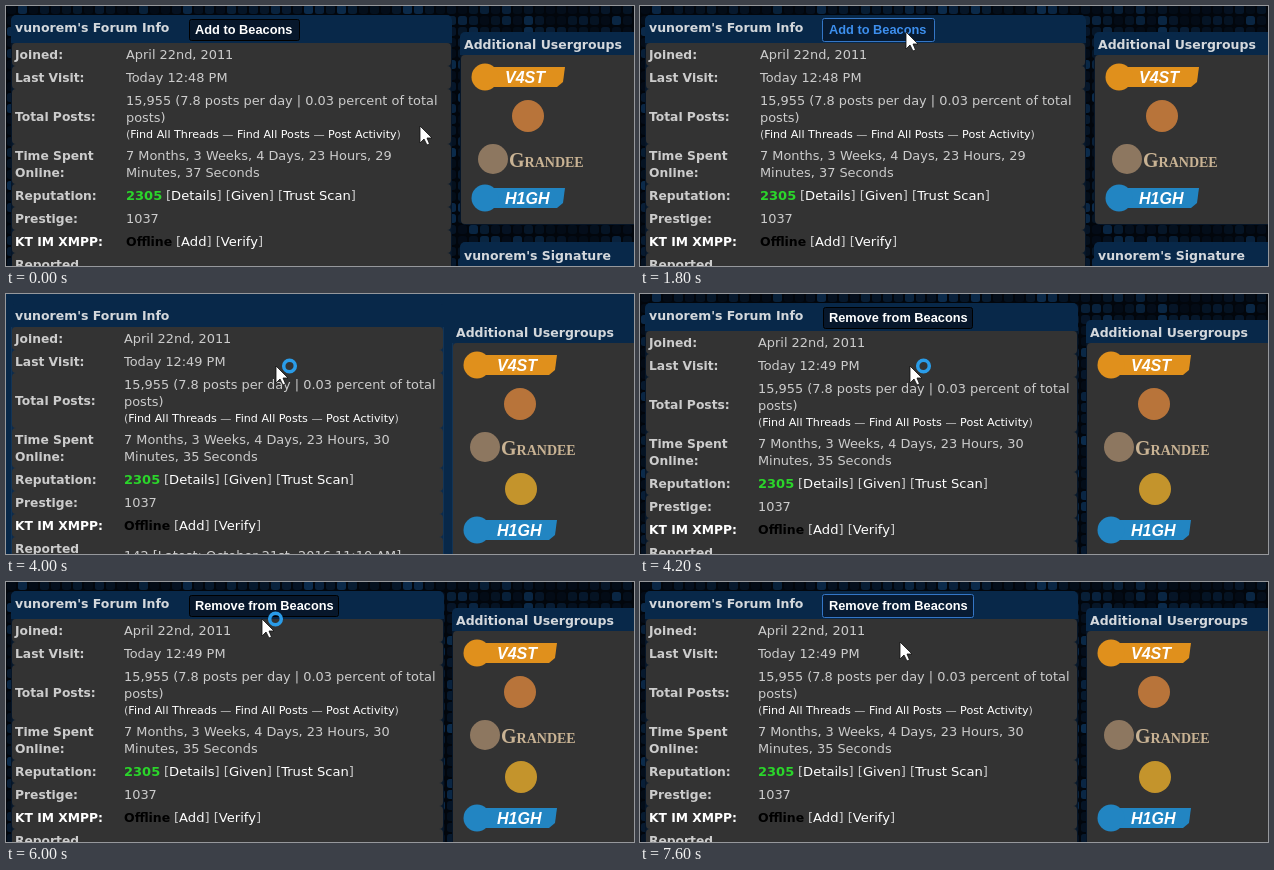
Recreate the animation shown at these times as an HTML page with a canvas. Size 628 by 260 pixels, loop 8000 ms.

```html
<!DOCTYPE html>
<html lang="en">
<head>
<meta charset="utf-8">
<title>Forum profile</title>
<style>
  html, body { margin: 0; width: 100%; height: 100%; overflow: hidden; background: #02060c; }
  canvas { display: block; }
</style>
</head>
<body>
<canvas id="stage" width="628" height="260"></canvas>
<script>
const ctx = document.getElementById('stage').getContext('2d');
const LOOP = 8000, STEP = 200;
const USER = 'vunorem', GROUP = 'Beacons';

const SANS = '"DejaVu Sans", sans-serif';
const BODY = '12.9px ' + SANS;
const LINK = '13.1px ' + SANS;
const BOLD = 'bold 12.5px ' + SANS;
const LABEL = 'bold 12.3px ' + SANS;
const SMALL = '11.15px ' + SANS;
const BUTTON = 'bold 12.8px "Liberation Sans", sans-serif';
const GRAY = '#cccccc', WHITE = '#ffffff', NAVY = '#082849', PANEL = '#333333';

// Pointer tip: [time, x, y]
const PATH = [
  [0, 414, 120], [1200, 303, 42], [1400, 282, 32], [1800, 266, 26],
  [3200, 266, 26], [3800, 268, 65], [4000, 270, 72], [5200, 270, 72],
  [6000, 256, 37], [6400, 254, 25], [7000, 254, 25], [7600, 260, 60], [LOOP, 260, 60]
];

function pointerAt(t) {
  const i = PATH.findIndex(key => key[0] > t);
  const [t0, x0, y0] = PATH[i - 1], [t1, x1, y1] = PATH[i];
  const k = (t - t0) / (t1 - t0);
  return [Math.round(x0 + (x1 - x0) * k), Math.round(y0 + (y1 - y0) * k)];
}

function text(str, x, y, font = BODY, color = GRAY) {
  ctx.font = font;
  ctx.fillStyle = color;
  ctx.fillText(str, x, y);
  return x + ctx.measureText(str).width;
}

// Words between *stars* are links
function linked(str, x, y, font = LINK) {
  str.split('*').forEach((part, i) => { x = text(part, x, y, font, i % 2 ? WHITE : GRAY); });
}

function box(x, y, w, h, radius, fill, stroke) {
  ctx.beginPath();
  ctx.roundRect(x, y, w, h, radius);
  ctx.fillStyle = fill;
  ctx.fill();
  if (stroke) {
    ctx.strokeStyle = stroke;
    ctx.lineWidth = 1;
    ctx.stroke();
  }
}

function polygon(points, fill) {
  ctx.beginPath();
  points.forEach(([x, y]) => ctx.lineTo(x, y));
  ctx.closePath();
  ctx.fillStyle = fill;
  ctx.fill();
}

function disc(x, y, r, fill) {
  ctx.beginPath();
  ctx.arc(x, y, r, 0, 7);
  ctx.fillStyle = fill;
  ctx.fill();
}

function background(plain) {
  ctx.fillStyle = plain ? NAVY : '#02060c';
  ctx.fillRect(0, 0, 628, 260);
  if (plain) return;
  for (let row = 0; row < 24; row++) {
    for (let col = 0; col < 58; col++) {
      const noise = (Math.abs(Math.sin(col * 12.9898 + row * 78.233) * 43758.5453) % 1) ** 2;
      box(col * 11 + 1, row * 11 - 1, 9, 9, 2.5, `rgb(${3 + 8 * noise},${11 + 32 * noise},${22 + 54 * noise})`);
    }
  }
}

function panel(x, y, w, headHeight, h, title, baseline, plain) {
  box(x + .5, y + .5, w, h, 5, plain ? '#0c2b4c' : '#08192c', plain ? '#123456' : '#061527');
  box(x, y, w + 1, headHeight, [5, 5, 0, 0], NAVY);
  text(title, x + 4, baseline, BOLD, '#d4d8dc');
}

function profile(after, loading) {
  const lift = loading ? -4 : 0, x = after ? 118 : 120, width = after ? 432 : 440;
  panel(5, 9, width, 28 + lift, 270, USER + "'s Forum Info", 26, loading);

  ctx.save();
  ctx.translate(0, lift);
  const rowTops = [37, 60, 83, 138, 178, 201, 224, 247, 290];
  rowTops.slice(1).forEach((bottom, i) => box(6, rowTops[i], width - 1, bottom - rowTops[i], 4, PANEL));

  const labels = [['Joined:', 53], ['Last Visit:', 76], ['Total Posts:', 115], ['Time Spent', 154],
    ['Online:', 171], ['Reputation:', 194], ['Prestige:', 217], ['Reported', 263]];
  labels.forEach(([label, y]) => text(label, 9, y, LABEL));
  text('KT IM XMPP:', 9, 240, LABEL, WHITE);

  text('April 22nd, 2011', x, 53);
  text(`Today 12:${after ? 49 : 48} PM`, x, 76);
  text('15,955 (7.8 posts per day | 0.03 percent of total', x, 99);
  text('posts)', x, 116);
  linked('(*Find All Threads* — *Find All Posts* — *Post Activity*)', x, 132, SMALL);
  text(`7 Months, 3 Weeks, 4 Days, 23 Hours, ${after ? 30 : 29}`, x, 154);
  text(`Minutes, ${after ? 35 : 37} Seconds`, x, 171);
  text('2305', x, 194, 'bold 13px ' + SANS, '#2bd52b');
  linked('[*Details*] [*Given*] [*Trust Scan*]', x + 40, 194);
  text('1037', x, 217);
  text('Offline', x, 240, BOLD, '#000000');
  linked('[*Add*] [*Verify*]', x + 50, 240);
  if (after) text('142 [Latest: October 21st, 2016 11:10 AM]', x, 270);
  ctx.restore();
}

function ribbon(label, y, color) {
  polygon([[479, y - 10], [559, y - 10], [557, y + 5], [551, y + 10], [479, y + 10]], color);
  disc(479, y, 13.5, color);
  text(label, 499, y + 6, 'italic bold 16px "Liberation Sans", sans-serif', WHITE);
}

function usergroups(after, plain) {
  const height = after ? 250 : 192;
  ctx.save();
  if (after) ctx.translate(-8, 0);
  panel(454, 26, 190, 23, height, 'Additional Usergroups', 43, plain);
  box(455, 49, 189, height - 23, 4, PANEL);
  ribbon('V4ST', 71, '#e0901c');
  disc(522, 110, 16, '#b8743a');
  disc(487, 153, 15, '#8d7760');
  const end = text('G', 503, 161, 'bold 20px "Liberation Serif", serif', '#c9b394');
  text('RANDEE', end, 161, 'bold 14px "Liberation Serif", serif', '#c9b394');
  if (after) disc(523, 195, 16, '#c4942c');
  ribbon('H1GH', after ? 236 : 192, '#2285c2');
  if (!after) panel(454, 236, 190, 24, 40, USER + "'s Signature", 254, plain);
  ctx.restore();
}

function button(after, hover, focus) {
  const width = after ? 150 : 111;
  if (focus) box(182.5, 12.5, width + 1, 23, 2, '#071b33', '#3476c6');
  else box(183.5, 13.5, width - 1, 21, 2, '#07172b', '#000000');
  text((after ? 'Remove from ' : 'Add to ') + GROUP, 189, 28, BUTTON, hover ? '#3d8fee' : WHITE);
}

function pointer(x, y, busy) {
  ctx.save();
  ctx.translate(x, y);
  polygon([[0, 0], [0, 17], [4, 13], [7, 19], [9.5, 18], [7, 12], [12, 12]], WHITE);
  ctx.strokeStyle = '#111';
  ctx.lineWidth = .8;
  ctx.stroke();
  if (busy) {
    ctx.beginPath();
    ctx.arc(13.5, 0, 5.8, 0, 7);
    ctx.strokeStyle = '#2a9ce8';
    ctx.lineWidth = 3.5;
    ctx.stroke();
  }
  ctx.restore();
}

function draw(t) {
  const within = (from, to) => t >= from && t < to;
  const after = t >= 4000, loading = within(4000, 4200);
  background(loading);
  profile(after, loading);
  usergroups(after, loading);
  if (!loading) {
    const hover = within(1400, 4000) || within(6200, 7400);
    const focus = within(1600, 4000) || t >= 6600;
    button(after, hover, focus);
  }
  pointer(...pointerAt(t), within(4000, 6200));
}

const start = performance.now();
function tick() {
  const t = (performance.now() - start) % LOOP;
  draw(Math.floor(t / STEP) * STEP);
  requestAnimationFrame(tick);
}
tick();
</script>
</body>
</html>
```
